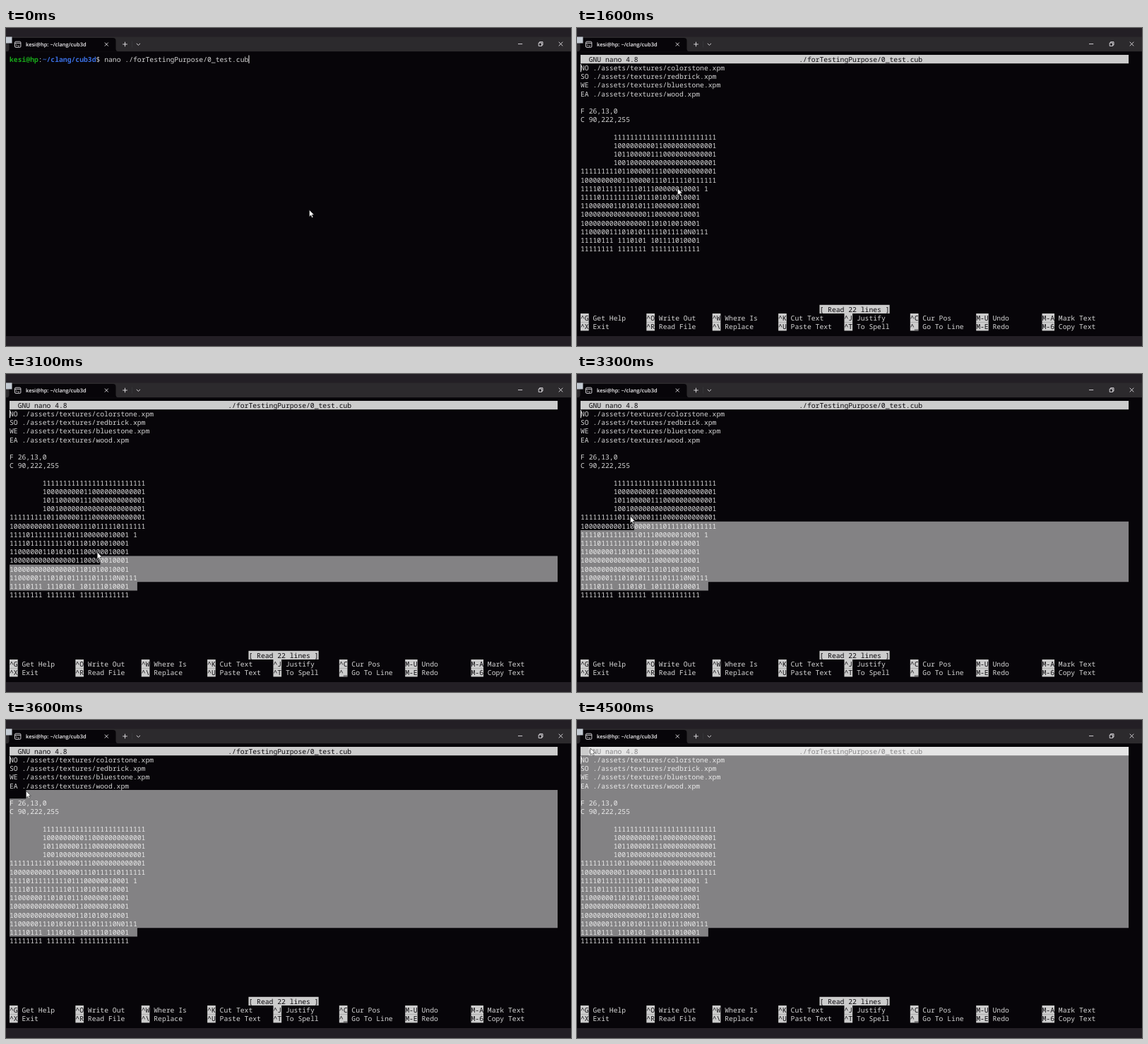
Animation of 800x450 px, one loop 5000 ms. Source, as an HTML page:

```html
<!DOCTYPE html>
<html lang="en">
<head>
<meta charset="utf-8">
<title>Terminal</title>
<style>
  html, body { margin: 0; width: 100%; height: 100%; overflow: hidden; background: #070509; }
  svg { display: block; width: 800px; height: 450px; }
  .mono text { font: 500 9.725px "Noto Sans Mono", "DejaVu Sans Mono", monospace; text-rendering: geometricPrecision; }
  .mono .bold { font-weight: 700; }
  .tab { font: 600 7.5px "Open Sans", "Noto Sans", sans-serif; text-rendering: geometricPrecision; }
  .icon { fill: none; stroke: #e6e4e8; stroke-width: .9; }
</style>
</head>
<body>
<svg viewBox="0 0 800 450">
  <rect width="800" height="450" fill="#070509"/>
  <rect width="800" height="13" fill="#231f25"/>
  <rect y="12.5" width="800" height="20.7" fill="#2c2a2d"/>
  <rect y="436" width="800" height="14" fill="#231f25"/>
  <path d="M1 33.2Q4.5 33.2 4.5 29.5V18Q4.5 14 8.5 14H151.5Q155.5 14 155.5 18V29.5Q155.5 33.2 159 33.2Z" fill="#070509"/>
  <rect y="12.5" width="8.5" height="9" fill="#c3cad2"/>

  <g class="icon">
    <rect x="12.5" y="19.2" width="8.4" height="8.2" rx="1.4"/>
    <path d="M12.5 21.4h8.4M14.3 23.1l1.3 1.2l-1.3 1.2M16.7 25.5h2.1"/>
    <path d="M139.8 20.6l5 5m0-5l-5 5"/>
    <path d="M165.2 23h6.6m-3.3-3.3v6.6"/>
    <path d="M184.8 21.9l2.6 2.5l2.6-2.5"/>
    <path d="M725 22.6h6.2"/>
    <path d="M754.2 21h4.4v4.4h-4.4zm1.4 0v-1.3h4.4v4.4h-1.4"/>
    <path d="M782.7 19.8l5.6 5.6m0-5.6l-5.6 5.6"/>
  </g>
  <path d="M178.5 18.5v9" stroke="#3d3b3f" stroke-width=".6"/>
  <text class="tab" x="28" y="26" fill="#f4f3f5">kesi@hp: ~/clang/cub3d</text>

  <g id="shell" class="mono"></g>
  <g id="editor" class="mono"></g>
  <path id="selection" fill="#fff" fill-opacity=".5"/>
  <path id="pointer" d="M0 0V9.4L2.2 7.4L3.8 10.9L5.3 10.2L3.8 6.8H6.7Z" fill="#fff" stroke="#111" stroke-width=".5"/>
</svg>
<script>
const LOOP = 5000, FRAME = 100, OPEN = 200, DRAG = 3000, LAG = 30;
const LEFT = 5, TOP = 38, CELL = 5.835, ROW = 12.2, COLS = 133;
const LIGHT = '#cccccc', TEXT = '#d6d6d6', DARK = '#0c0a0e';
const $ = id => document.getElementById(id);
const shell = $('shell'), editor = $('editor'), selection = $('selection'), pointer = $('pointer');
const colX = col => LEFT + col * CELL;
const rowY = row => TOP + row * ROW;

function add(parent, tag, attrs, content = '') {
  const node = document.createElementNS('http://www.w3.org/2000/svg', tag);
  for (const key in attrs) node.setAttribute(key, attrs[key]);
  node.textContent = content;
  parent.append(node);
}
const write = (parent, row, col, content, fill = TEXT, cls = '') =>
  add(parent, 'text', { x: colX(col), y: rowY(row) + 9.7, fill, class: cls }, content);
const box = (row, col, count) =>
  add(editor, 'rect', { x: colX(col), y: rowY(row), width: count * CELL, height: ROW, fill: LIGHT });
const caret = (parent, row, col) =>
  add(parent, 'rect', { x: colX(col), y: rowY(row) + .6, width: 1, height: 11.4, fill: '#f2f2f2' });

function inverse(row, col, content) {
  box(row, col, content.length);
  write(editor, row, col, content, DARK);
}

// Shell prompt
write(shell, 0, 0, 'kesi@hp', '#18a81a', 'bold');
write(shell, 0, 7, ':');
write(shell, 0, 8, '~/clang/cub3d', '#3b70e4', 'bold');
write(shell, 0, 21, '$');
write(shell, 0, 23, 'nano ./forTestingPurpose/0_test.cub');
caret(shell, 0, 58);

// Editor
const file = `NO ./assets/textures/colorstone.xpm
SO ./assets/textures/redbrick.xpm
WE ./assets/textures/bluestone.xpm
EA ./assets/textures/wood.xpm

F 26,13,0
C 90,222,255

        1111111111111111111111111
        1000000000110000000000001
        1011000001110000000000001
        1001000000000000000000001
111111111011000001110000000000001
100000000011000001110111110111111
11110111111111011100000010001 1
11110111111111011101010010001
11000000110101011100000010001
10000000000000001100000010001
10000000000000001101010010001
11000001110101011111011110N0111
11110111 1110101 101111010001
11111111 1111111 111111111111`;
const shortcuts = [
  ['^G Get Help', '^X Exit'], ['^O Write Out', '^R Read File'],
  ['^W Where Is', '^\\ Replace'], ['^K Cut Text', '^U Paste Text'],
  ['^J Justify', '^T To Spell'], ['^C Cur Pos', '^_ Go To Line'],
  ['M-U Undo', 'M-E Redo'], ['M-A Mark Text', 'M-6 Copy Text']
];

box(0, 0, COLS);
write(editor, 0, 2, 'GNU nano 4.8', DARK);
write(editor, 0, 53, './forTestingPurpose/0_test.cub', DARK);
file.split('\n').forEach((line, i) => {
  const words = line.trimStart();
  if (words) write(editor, i + 1, line.length - words.length, words);
});
caret(editor, 1, 0);
inverse(29, 58, '[ Read 22 lines ]');
shortcuts.forEach((pair, i) => pair.forEach((item, j) => {
  const cut = item.indexOf(' ');
  inverse(30 + j, i * 16, item.slice(0, cut));
  write(editor, 30 + j, i * 16 + cut + 1, item.slice(cut + 1));
}));

// The pointer rests between these moves
const home = { x: 429.5, y: 257.5 };
const moves = [
  { start: 1000, end: 1200, x: 194, y: 132 },
  { start: 1400, end: 1600, x: 142.5, y: 227 },
  { start: 1800, end: 2500, x: 183, y: 303 },
  { start: 2900, end: 3300, x: 75.5, y: 201.5 },
  { start: 3300, end: 3600, x: 28.5, y: 100.5 },
  { start: 3600, end: 4100, x: 19, y: 74 },
  { start: 4100, end: 4500, x: 19, y: 40 }
];

function pointerAt(time) {
  let { x, y } = home;
  for (const move of moves) {
    const p = Math.min(1, Math.max(0, (time - move.start) / (move.end - move.start)));
    x += (move.x - x) * p;
    y += (move.y - y) * p;
  }
  return { x, y };
}

// The selection trails the pointer slightly and ends at row 21, column 31
function selectionPath(time) {
  const { x, y } = pointerAt(time - LAG);
  const row = Math.floor((y - TOP) / ROW);
  const start = colX(Math.floor((x - LEFT) / CELL));
  return `M${start} ${rowY(row)}H${colX(COLS)}V${rowY(21)}H${colX(31)}V${rowY(22)}H${LEFT}V${rowY(row + 1)}H${start}Z`;
}

function draw() {
  const time = Math.floor(performance.now() % LOOP / FRAME) * FRAME;
  const { x, y } = pointerAt(time);
  const editing = time >= OPEN;
  shell.setAttribute('visibility', editing ? 'hidden' : 'visible');
  editor.setAttribute('visibility', editing ? 'visible' : 'hidden');
  pointer.setAttribute('transform', `translate(${x} ${y})`);
  selection.setAttribute('d', time >= DRAG ? selectionPath(time) : '');
  requestAnimationFrame(draw);
}
draw();
</script>
</body>
</html>
```
